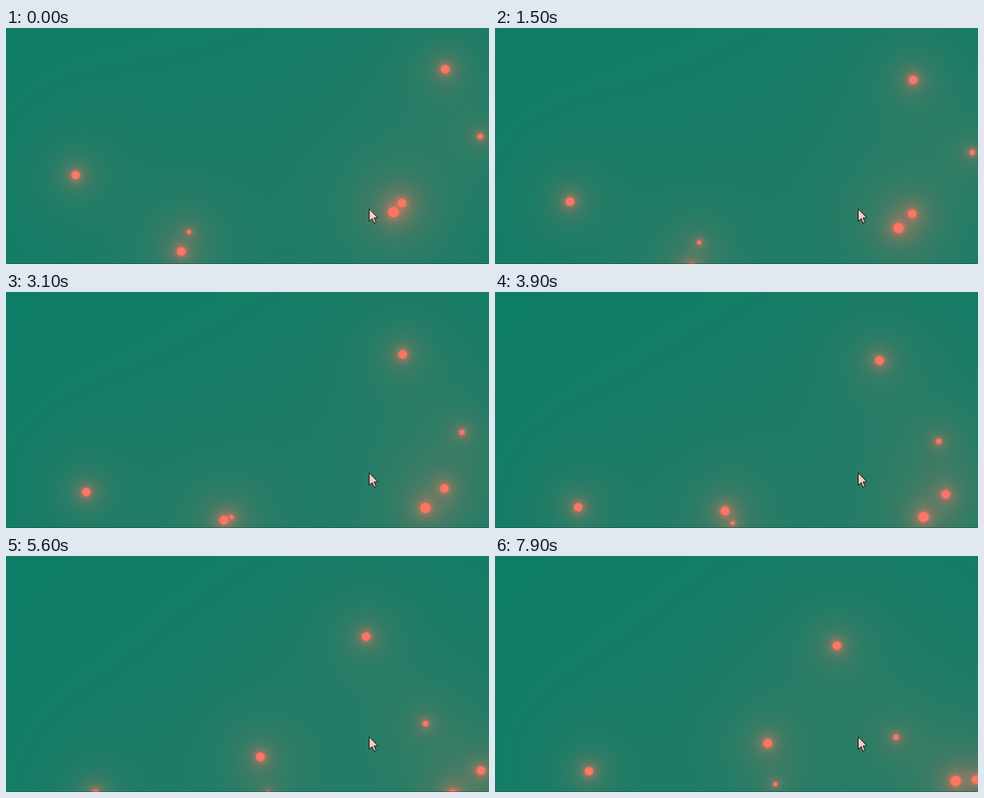
An HTML page with a canvas for the animation above (8000 ms loop, 635 by 312 pixels).

```html
<!DOCTYPE html>
<html lang="en">
<head>
<meta charset="utf-8">
<title>Drifting lights</title>
<style>
  html, body { margin: 0; width: 100%; height: 100%; overflow: hidden; background: #107b66; }
  canvas { display: block; width: 635px; height: 312px; }
</style>
</head>
<body>
<canvas id="stage" width="635" height="312"></canvas>
<script>
const W = 635, H = 312, LOOP = 8000;
const BASE = [2, 125, 103];
const GLOW = [255, 118, 94];
const CORE = '#fd7565';
const SPREAD = 0.62;

const ctx = document.getElementById('stage').getContext('2d');
const image = ctx.createImageData(W, H);

// Start, velocity per step, radius, and the walls each light bounces off.
const lights = [
  { x: 577.5, y: 54.5, vx: -4, vy: 2, r: 5.6 },
  { x: 91.5, y: 194.5, vx: 1, vy: 5, r: 5.5 },
  { x: 230.5, y: 295.5, vx: 4, vy: 3, r: 5.7 },
  { x: 240.5, y: 269.5, vx: 4, vy: 2, r: 2.6, bottom: 317.5 },
  { x: 623.5, y: 143.5, vx: -0, vy: 3, r: 3.5 },
  { x: 509.5, y: 243.5, vx: 3, vy: 3, r: 6.8, bottom: 318.5 },
  { x: 520.5, y: 231.5, vx: 4, vy: 2, r: 5.5, right: 640.5 }
];
lights[4].vx = 4;

// Moments at which the scene advances by one step.
const ticks = [];
const addRun = (from, to) => {
  for (let t = from; t <= to; t += 200) ticks.push(t);
};
addRun(300, 1500);
addRun(1800, 2800);
addRun(3100, 4300);
addRun(4600, 5800);
ticks.push(6100, 6400, 6900, 7400, 7900);

const reflect = (p, wall) => p > wall ? 2 * wall - p : p;

function place(light, step) {
  return {
    x: reflect(light.x + light.vx * step, light.right || 639.5),
    y: reflect(light.y + light.vy * step, light.bottom || 319.5),
    r: light.r
  };
}

function paintGlow(spots) {
  const data = image.data;
  let i = 0;
  for (let y = 0; y < H; y++) {
    for (let x = 0; x < W; x++) {
      let clear = 1;
      for (const s of spots) {
        const dx = x + 0.5 - s.x, dy = y + 0.5 - s.y;
        const d = Math.sqrt(dx * dx + dy * dy);
        clear *= 1 - SPREAD * s.r / Math.max(d, s.r);
      }
      for (let c = 0; c < 3; c++) {
        data[i++] = GLOW[c] + (BASE[c] - GLOW[c]) * clear;
      }
      data[i++] = 255;
    }
  }
  ctx.putImageData(image, 0, 0);
}

function paintCores(spots) {
  ctx.fillStyle = CORE;
  for (const s of spots) {
    ctx.beginPath();
    ctx.arc(s.x, s.y, s.r, 0, 2 * Math.PI);
    ctx.fill();
  }
}

const pointer = new Path2D('M477.5 239v16.5l3.8-3.5 2.7 6 2.5-1.1-2.6-5.9h5z');

function paintPointer() {
  ctx.fillStyle = '#ffc9c4';
  ctx.fill(pointer);
  ctx.strokeStyle = '#141414';
  ctx.lineWidth = 1;
  ctx.stroke(pointer);
}

function paint(step) {
  const spots = lights.map(light => place(light, step));
  paintGlow(spots);
  paintCores(spots);
  ctx.fillStyle = 'rgba(40, 55, 58, 0.45)';
  ctx.fillRect(0, H - 1, W, 1);
  paintPointer();
}

let shown = -1;
const start = performance.now();

function frame() {
  const time = (performance.now() - start) % LOOP;
  const step = ticks.filter(t => t <= time).length;
  if (step !== shown) {
    paint(step);
    shown = step;
  }
  requestAnimationFrame(frame);
}
frame();
</script>
</body>
</html>
```
